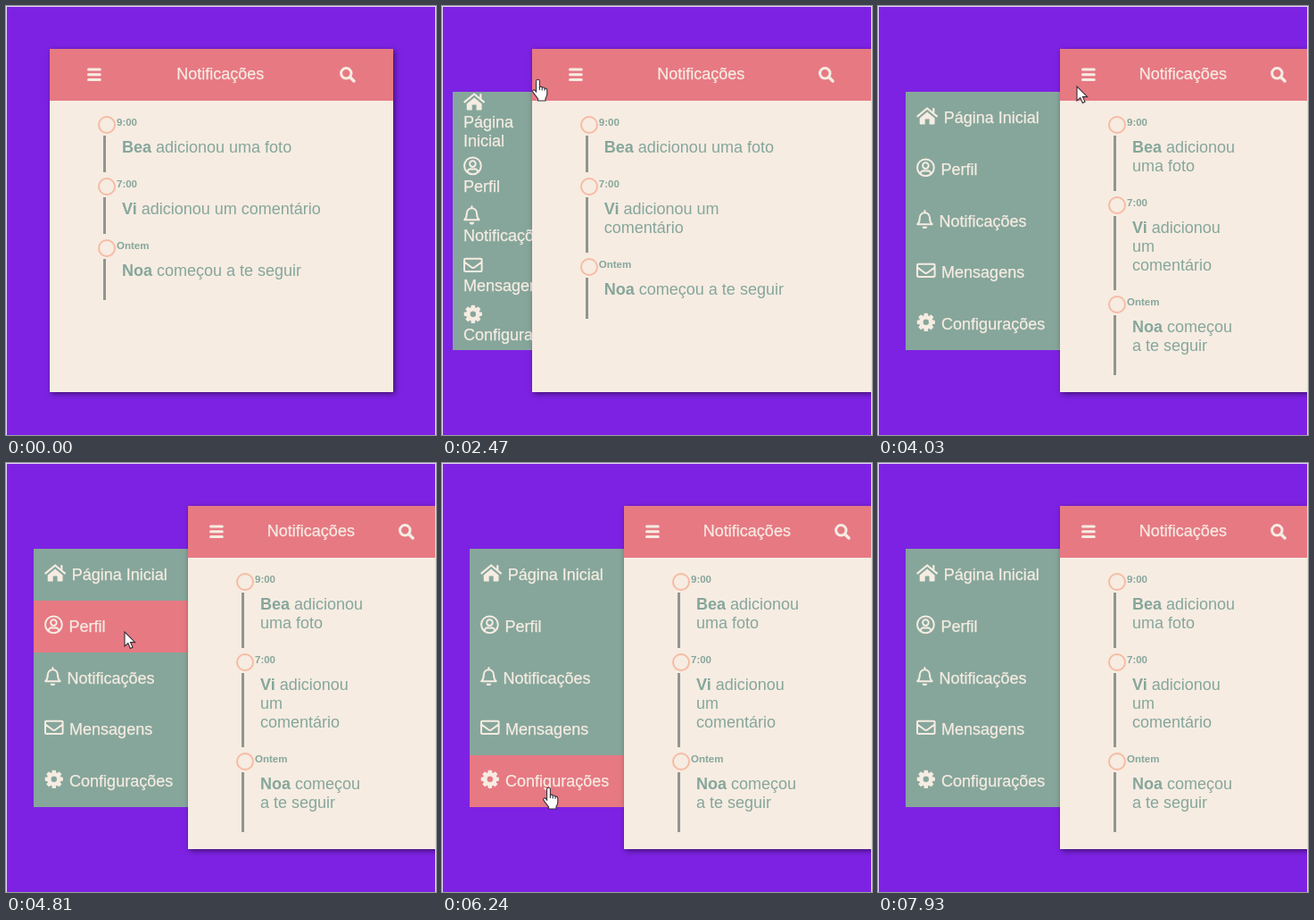
Recreate the animation shown at these times as an HTML page. Size 482 px wide and 480 px high, loop 8000 ms.

```html
<!DOCTYPE html>
<html lang="pt-BR">
<head>
<meta charset="utf-8">
<title>Notificações</title>
<style>
  :root {
    --cream: #f6ece2; --pink: #e77983; --green: #86a69b; --purple: #7d22e3;
    --side-x: 49px; --side-w: 0px; --panel-x: 49px; --panel-w: 385px; --text-w: 240px;
  }
  * { box-sizing: border-box; margin: 0; padding: 0; }
  html, body { width: 100%; height: 100%; overflow: hidden; }
  body {
    position: relative; background: var(--purple); color: var(--cream);
    font: 18px/21px "Liberation Sans", Arial, sans-serif;
  }
  body::after {
    content: ""; position: absolute; inset: 0; pointer-events: none;
    border: solid #e6d6f8; border-width: 1px 1px 0 1px;
  }
  ul { list-style: none; }
  svg { fill: currentColor; }
  .line { fill: none; stroke: currentColor; stroke-linecap: round; stroke-linejoin: round; }
  .side, header { -webkit-text-stroke: .25px; }

  .side {
    position: absolute; left: var(--side-x); top: 96px; width: var(--side-w); height: 289px;
    display: flex; flex-direction: column; background: var(--green);
  }
  .side li { flex: 1 1 0; display: flex; align-items: center; padding: 0 12px 2px; }
  .side li.on { background: var(--pink); }
  .side a { min-width: 0; }
  .side svg { height: 21.6px; margin-right: 1.5px; vertical-align: -2.7px; }

  .panel {
    position: absolute; left: var(--panel-x); top: 48px; width: var(--panel-w); height: 384px;
    background: var(--cream); box-shadow: 2px 2px 6px rgba(0, 0, 0, .5);
  }
  header {
    height: 58px; padding-bottom: 1px; background: var(--pink);
    display: flex; justify-content: space-around; align-items: center;
  }
  header svg { height: 18px; flex: none; }
  .feed { position: absolute; left: 0; top: 74px; color: var(--green); }
  .feed li { position: relative; padding: 26px 0 22px 81px; }
  .feed p { width: var(--text-w); }
  .feed li::before {
    content: ""; position: absolute; left: 54px; top: 1px; width: 16px; height: 16px;
    border: 2px solid #f7bba3; border-radius: 50%;
  }
  .feed li::after {
    content: ""; position: absolute; left: 60px; top: 23px; bottom: 5px; width: 3px;
    background: #8f968f;
  }
  .feed li:last-child::after { bottom: 0; }
  .feed time { position: absolute; left: 75px; top: -2px; font-size: 11.5px; font-weight: bold; }

  #cursor { position: absolute; left: 0; top: 0; pointer-events: none; z-index: 2; }
  #cursor svg { position: absolute; overflow: visible; fill: #fff; stroke: #33303a; stroke-width: 1.1; }
  #cursor .hand, #cursor.link .arrow { display: none; }
  #cursor.link .hand { display: block; }
</style>
</head>
<body>
<ul class="side">
  <li><a><svg width="24.3" viewBox="0 0 24.3 21.6"><path d="M12.1 6.6 20.6 13.6V19.6a1 1 0 0 1-1 1H14.6V14.6H9.7V20.6H4.7a1 1 0 0 1-1-1V13.6Z"/><path class="line" stroke-width="2.2" d="M1.4 11.4 12.1 2.5 22.9 11.4M19.3 3V7"/></svg> Página Inicial</a></li>
  <li><a><svg width="20.9" viewBox="0 0 20.9 21.6"><circle class="line" cx="10.4" cy="10.8" r="9.4" stroke-width="2"/><circle class="line" cx="10.4" cy="8.6" r="3.3" stroke-width="2"/><path class="line" stroke-width="2" d="M4.6 17.2Q5.6 14.2 8 14.2 10.4 15 12.8 14.2 15.2 14.2 16.2 17.2"/></svg> Perfil</a></li>
  <li><a><svg width="18.9" viewBox="0 0 18.9 21.6"><path class="line" stroke-width="2" d="M9.4 1V3M1.2 16.2Q3.8 13.8 3.8 9A5.6 5.8 0 0 1 15 9Q15 13.8 17.7 16.2Z"/><path d="M6.7 18.8H12.1A2.7 2.8 0 0 1 6.7 18.8"/></svg> Notificações</a></li>
  <li><a><svg width="21.6" viewBox="0 0 21.6 21.6"><path class="line" stroke-width="2" d="M2.5 3.7H19.1Q20.6 3.7 20.6 5.2V16.4Q20.6 17.9 19.1 17.9H2.5Q1 17.9 1 16.4V5.2Q1 3.7 2.5 3.7ZM1.2 7.6 9 13.3Q10.8 14.5 12.6 13.3L20.4 7.6"/></svg> Mensagens</a></li>
  <li><a><svg width="21.6" viewBox="0 0 21.6 21.6"><circle class="line" cx="10.8" cy="10.8" r="5.5" stroke-width="4.6"/><g id="teeth"></g></svg> Configurações</a></li>
</ul>

<main class="panel">
  <header>
    <svg width="15.75" viewBox="0 0 15.75 18"><path class="line" stroke-width="3" d="M1.5 3H14.3M1.5 8.8H14.3M1.5 14.6H14.3"/></svg>
    <span>Notificações</span>
    <svg width="18" viewBox="0 0 18 18"><circle class="line" cx="7.3" cy="7.3" r="5.7" stroke-width="3"/><path class="line" stroke-width="3.4" d="M12 12 16 16"/></svg>
  </header>
  <ul class="feed">
    <li><time>9:00</time><p><b>Bea</b> adicionou uma foto</p></li>
    <li><time>7:00</time><p><b>Vi</b> adicionou um comentário</p></li>
    <li><time>Ontem</time><p><b>Noa</b> começou a te seguir</p></li>
  </ul>
</main>

<div id="cursor">
  <svg class="arrow" width="13" height="19"><path d="M0 0V16L3.8 12.6 6.4 18.4 9 17.2 6.5 11.6H11.6Z"/></svg>
  <svg class="hand" width="18" height="25" style="left:-6px"><path d="M4.6 2.2a1.9 1.9 0 0 1 3.8 0V8.6Q10.2 7.4 11.2 9.2 13.2 8.4 14 10.2 16.8 9.8 16.8 12.4V16.6Q16.8 19 15 21.4V24H6.6V21.8Q4 18.6 .9 14.4C-.2 12.4 2 11 3.4 12.6L4.6 14Z"/><path fill="none" d="M8.4 8.6V12M11.2 9.4V12.4M14 10.4V12.8"/></svg>
</div>

<script>
  const LOOP = 8000, STEP = 130;
  const OPEN_AT = 2320, OPEN_FOR = 500, SIDE_W = 173;
  const root = document.documentElement;
  const cursor = document.getElementById('cursor');
  const rows = document.querySelectorAll('.side li');

  // time, x, y of the pointer's hot spot
  const path = [
    [520, 190, 490], [1170, 99, 75], [1820, 99, 75], [2470, 107, 82],
    [2730, 125, 86], [3640, 223, 90], [4030, 223, 90], [4810, 133, 189],
    [5300, 126, 236], [5720, 121, 296], [6240, 119, 363], [6760, 119, 363], [7410, 150, 490]
  ];

  for (let i = 0; i < 8; i++) {
    const tooth = document.createElementNS('http://www.w3.org/2000/svg', 'rect');
    const attrs = { x: 8.5, y: .7, width: 4.6, height: 4, rx: 1, transform: `rotate(${i * 45} 10.8 10.8)` };
    for (const k in attrs) tooth.setAttribute(k, attrs[k]);
    document.getElementById('teeth').append(tooth);
  }

  const clamp = v => Math.min(1, Math.max(0, v));
  const mix = (a, b, k) => a + (b - a) * k;
  const bez = (a, b, u) => 3 * a * u * (1 - u) ** 2 + 3 * b * u * u * (1 - u) + u ** 3;

  // CSS "ease"
  function ease(x) {
    let lo = 0, hi = 1;
    for (let i = 0; i < 24; i++) {
      const u = (lo + hi) / 2;
      if (bez(.25, .25, u) < x) lo = u; else hi = u;
    }
    return bez(.1, 1, lo);
  }

  function pointAt(t) {
    const i = path.findIndex(p => p[0] > t);
    if (i < 1) return null;
    const [t0, x0, y0] = path[i - 1], [t1, x1, y1] = path[i];
    const k = (t - t0) / (t1 - t0), s = k * k * (3 - 2 * k);
    return [mix(x0, x1, s), mix(y0, y1, s)];
  }

  function layout(t) {
    const w = SIDE_W * ease(clamp((t - OPEN_AT) / OPEN_FOR));
    const x = w < 74 ? 49 - w / 2 : mix(12, 31, clamp((w - 89) / (SIDE_W - 89)));
    const left = x + w, width = Math.min(385, 482 - left);
    const text = width > 383 ? 240 : Math.min(width - 161, 215);
    const vars = { 'side-x': x, 'side-w': w, 'panel-x': left, 'panel-w': width, 'text-w': text };
    for (const k in vars) root.style.setProperty('--' + k, vars[k].toFixed(2) + 'px');
  }

  function point(t) {
    const p = pointAt(t);
    const hit = p && document.elementFromPoint(...p);
    const row = hit && hit.closest('.side li');
    rows.forEach(r => r.classList.toggle('on', r === row));
    cursor.style.display = p ? '' : 'none';
    if (!p) return;
    cursor.style.transform = `translate(${p[0].toFixed(1)}px, ${p[1].toFixed(1)}px)`;
    const onLink = hit && hit.closest('.side a');
    cursor.classList.toggle('link', (t >= 1040 && t < 2600) || !!onLink);
  }

  function draw(now) {
    const t = now % LOOP, held = t - t % STEP;
    layout(held);
    point(held);
    requestAnimationFrame(draw);
  }
  draw(performance.now());
</script>
</body>
</html>
```
